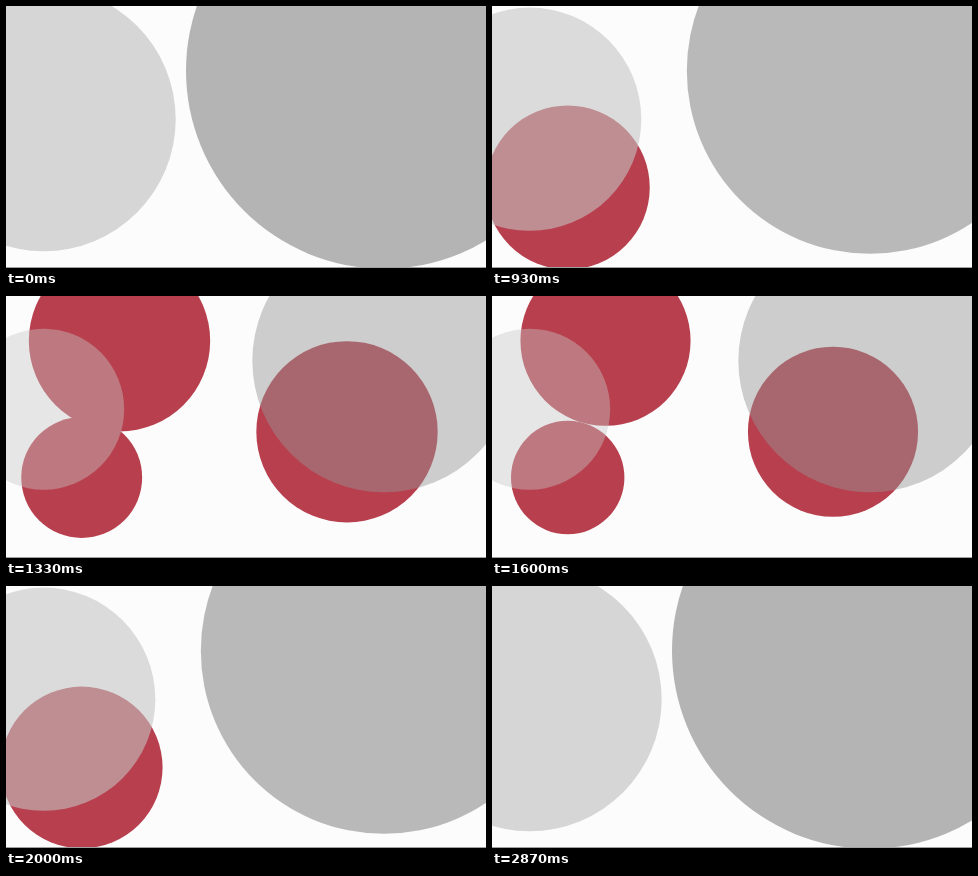
These frames come from a looping animation (480x262 px, 2.99 s). An HTML page with a canvas:

```html
<!DOCTYPE html>
<html lang="en">
<head>
<meta charset="utf-8">
<title>Pulsing circles</title>
<style>
  html, body { margin: 0; width: 100%; height: 100%; overflow: hidden; background: #fcfcfc; }
  canvas { display: block; width: 100vw; height: 100vh; }
</style>
</head>
<body>
<canvas width="480" height="262"></canvas>
<script>
const ctx = document.querySelector('canvas').getContext('2d');
const LOOP = 2990, FPS = 15, LAST = 43;
const RED = '#b8404e';

// Every circle shrinks to half its size and back; on/off are steps of visibility.
const reds = [
  { x: 75.7, y: 181.5, r: 88, on: 5, off: 37 },
  { x: 113.5, y: 44.8, r: 132, on: 17, off: 27 },
  { x: 341, y: 135.8, r: 132, on: 17, off: 27 }
];
const grays = [
  { x: 37.7, y: 113.2, r: 132, power: 2.6, color: '#c5c5c5' },
  { x: 378, y: 64.7, r: 198, power: 4.2, color: '#949494' }
];

function pulse(step, middle, power) {
  const nearness = Math.max(0, 1 - Math.abs(step - middle) / middle);
  return 1 - nearness ** power / 2;
}

function disc({ x, y, r }, scale, color, alpha) {
  ctx.globalAlpha = alpha;
  ctx.fillStyle = color;
  ctx.beginPath();
  ctx.arc(x, y, r * scale, 0, 2 * Math.PI);
  ctx.fill();
}

function draw(now) {
  const step = Math.min(LAST, Math.floor(now % LOOP * FPS / 1000 + 0.06));
  ctx.globalAlpha = 1;
  ctx.fillStyle = '#fcfcfc';
  ctx.fillRect(0, 0, 480, 262);

  for (const c of reds) {
    if (step >= c.on && step < c.off) disc(c, pulse(step, 22.3, 4.3), RED, 1);
  }
  for (const c of grays) {
    const scale = pulse(step, 22, c.power);
    disc(c, scale, c.color, 0.69 * scale);
  }

  ctx.globalAlpha = 1;
  ctx.fillStyle = '#a0a0a0';
  ctx.fillRect(0, 261, 480, 1);
}

const start = performance.now();
function tick() {
  draw(performance.now() - start);
  requestAnimationFrame(tick);
}
tick();
</script>
</body>
</html>
```
